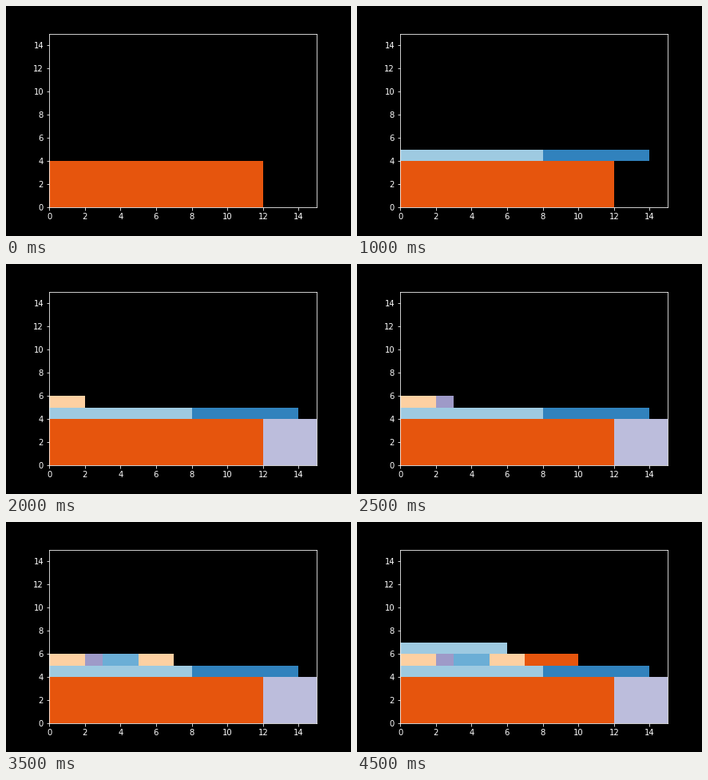
Animation, 432 px wide and 288 px high, one loop 5 s. Source, as a matplotlib script:

```python
import matplotlib.pyplot as plt
from matplotlib.animation import FuncAnimation
from matplotlib.patches import Rectangle

SIZE = 15
STEP_MS = 500

# x, y, width, height, colour, in order of placement
BLOCKS = [
    (0, 0, 12, 4, "#e6550d"),
    (0, 4, 8, 1, "#9ecae1"),
    (8, 4, 6, 1, "#3182bd"),
    (12, 0, 3, 4, "#bcbddc"),
    (0, 5, 2, 1, "#fdd0a2"),
    (2, 5, 1, 1, "#9e9ac8"),
    (3, 5, 2, 1, "#6baed6"),
    (5, 5, 2, 1, "#fdd0a2"),
    (7, 5, 3, 1, "#e6550d"),
    (0, 6, 6, 1, "#9ecae1"),
]

plt.style.use("dark_background")
fig = plt.figure(figsize=(6, 4), dpi=72)
ax = fig.add_axes([0.125, 0.125, 0.775, 0.755])
ax.set_xlim(0, SIZE)
ax.set_ylim(0, SIZE)
ax.set_xticks(range(0, SIZE, 2))
ax.set_yticks(range(0, SIZE, 2))

rects = [
    ax.add_patch(Rectangle((x, y), w, h, facecolor=color, edgecolor="none"))
    for x, y, w, h, color in BLOCKS
]


def update(step):
    for i, rect in enumerate(rects):
        rect.set_visible(i <= step)
    return rects


anim = FuncAnimation(
    fig,
    update,
    frames=len(BLOCKS),
    init_func=lambda: update(0),
    interval=STEP_MS,
    repeat=True,
    repeat_delay=0,
    blit=False,
)
plt.show()
```
